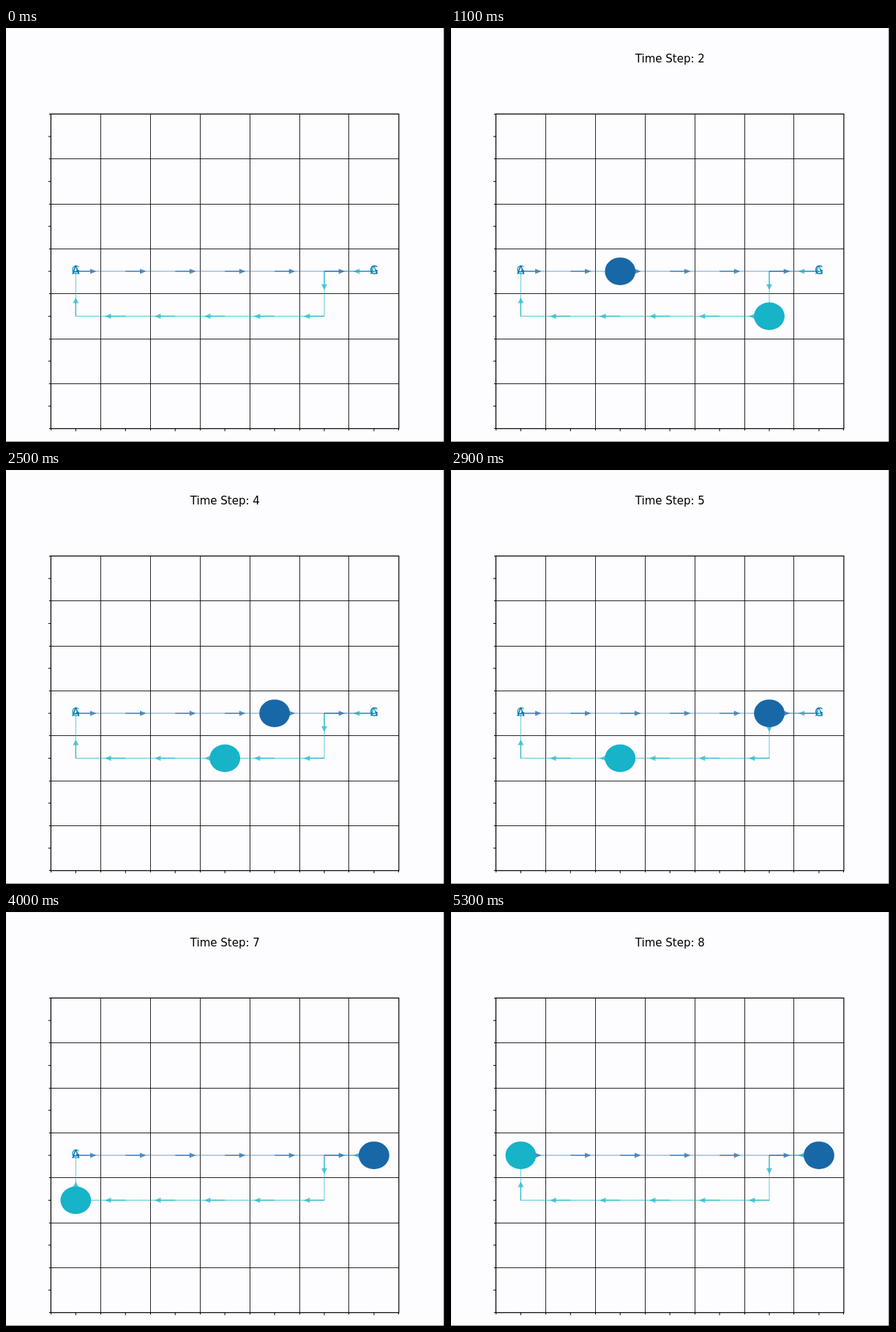
Animation of 600x565 px, one loop 5.9 s. Source, as an HTML page:

```html
<!DOCTYPE html>
<html lang="en">
<head>
<meta charset="utf-8">
<title>Grid paths</title>
<style>
  html, body { margin: 0; width: 100%; height: 100%; overflow: hidden; background: #fdfcfe; }
  svg { display: block; }
  text { font: 15px "DejaVu Sans", sans-serif; text-anchor: middle; }
</style>
</head>
<body>
<svg id="stage" width="600" height="565" viewBox="0 0 600 565"></svg>
<script>
const LOOP = 5900, START = 100, STEP = 500, CELLS = 7;
const LEFT = 61.4, TOP = 117.4, W = 67.93, H = 61.33;
const BLUE = '#1868a8', TEAL = '#17b3c9';
const stage = document.getElementById('stage');

// One [column, row] per time step.
const routes = [
  { color: BLUE, cells: Array.from({ length: 7 }, (_, k) => [k, 3]) },
  { color: TEAL, cells: [[6, 3], [5, 3], ...Array.from({ length: 6 }, (_, k) => [5 - k, 4]), [0, 3]] }
];

const px = col => LEFT + (col + 0.5) * W;
const py = row => TOP + (row + 0.5) * H;
const point = (col, row) => `${px(col).toFixed(2)},${py(row).toFixed(2)}`;

function add(tag, attrs, text = '') {
  const node = document.createElementNS('http://www.w3.org/2000/svg', tag);
  for (const name in attrs) node.setAttribute(name, attrs[name]);
  node.textContent = text;
  return stage.appendChild(node);
}

function drawGrid() {
  const right = LEFT + CELLS * W, bottom = TOP + CELLS * H;
  let lines = '', ticks = '';
  for (let i = 0; i <= CELLS; i++) {
    const x = Math.round(LEFT + i * W - 0.5) + 0.5;
    const y = Math.round(TOP + i * H - 0.5) + 0.5;
    if (i > 0 && i < CELLS) lines += `M${x},${TOP}V${bottom}M${LEFT},${y}H${right}`;
    ticks += `M${x},${bottom}v2.5M${LEFT},${y}h-2.5`;
    if (i < CELLS) ticks += `M${px(i)},${bottom}v3.6M${LEFT},${py(i)}h-3.6`;
  }
  add('path', { d: lines, stroke: '#000', 'stroke-width': 0.85 });
  add('path', { d: ticks, stroke: '#000' });
  add('rect', { x: LEFT, y: TOP, width: right - LEFT, height: bottom - TOP,
    fill: 'none', stroke: '#000', 'stroke-width': 1.2 });
}

function drawArrow([c, r], [c2, r2], color) {
  const dx = c2 - c, dy = r2 - r;
  const at = (along, side) => point(c + dx * along - dy * side, r + dy * along + dx * side);
  add('path', { d: `M${at(0, 0)}L${at(0.3, 0)}`, stroke: color, 'stroke-width': 1.4, opacity: 0.7 });
  add('path', { d: `M${at(0.29, 0.06)}L${at(0.415, 0)}L${at(0.29, -0.06)}Z`, fill: color, opacity: 0.7 });
}

function drawRoute({ color, cells }) {
  add('polyline', { points: cells.map(cell => point(...cell)).join(' '),
    fill: 'none', stroke: color, 'stroke-width': 1.1, opacity: 0.6 });
  cells.slice(1).forEach((cell, k) => drawArrow(cells[k], cell, color));
  [['A', cells[0]], ['G', cells[cells.length - 1]]].forEach(([letter, [c, r]]) =>
    add('text', { x: px(c), y: py(r) + 4.3, fill: color }, letter));
}

add('path', { d: 'M0,.5H600M.5,0V565', stroke: '#f1f0f2' });
add('path', { d: 'M0,564.5H600', stroke: '#888' });
add('path', { d: 'M599.2,0V565', stroke: '#000', 'stroke-width': 1.6 });
drawGrid();
[...routes].reverse().forEach(drawRoute);
const discs = routes.map(({ color }) => add('ellipse', { rx: 0.308 * W, ry: 0.308 * H, fill: color }));
const title = add('text', { x: 299.3, y: 46.5 });

function render(now) {
  const step = Math.min(8, Math.floor((now % LOOP - START) / STEP));
  const running = step >= 0;
  title.textContent = running ? `Time Step: ${step}` : '';
  routes.forEach(({ cells }, i) => {
    const [c, r] = cells[Math.max(0, Math.min(step, cells.length - 1))];
    discs[i].setAttribute('cx', px(c));
    discs[i].setAttribute('cy', py(r));
    discs[i].setAttribute('visibility', running ? 'visible' : 'hidden');
  });
}

const begin = performance.now();
function tick() {
  render(performance.now() - begin);
  requestAnimationFrame(tick);
}
tick();
</script>
</body>
</html>
```
